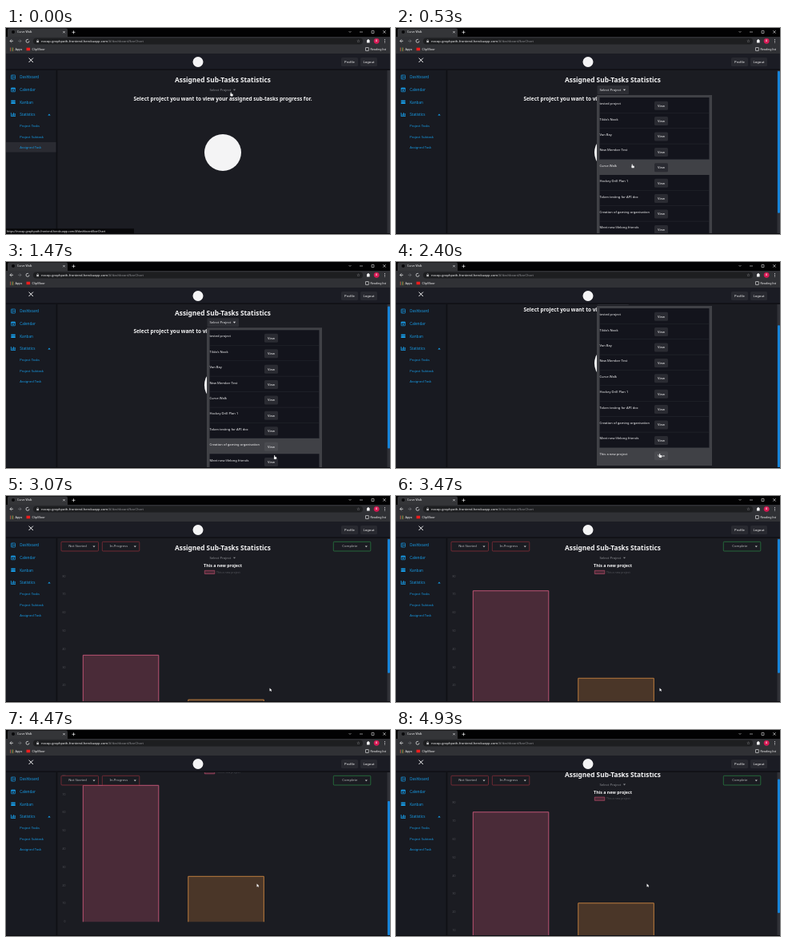
Write an HTML page with a canvas that moves like this. It is 480 px wide and 258 px high and loops after 5.07 s.

```html
<!DOCTYPE html>
<html lang="en">
<head>
<meta charset="utf-8">
<title>Sub-task statistics</title>
<style>
  html, body { margin: 0; width: 100%; height: 100%; overflow: hidden; background: #1b1c22; }
  canvas { display: block; width: 480px; height: 258px; }
</style>
</head>
<body>
<canvas id="stage"></canvas>
<script>
const W = 480, H = 258, LOOP = 5070, STEP = 200 / 3, LAST_STEP = 74;
const OPEN = 265, CLOSE = 2460, CHART = 2925, BAR_START = 2912;
const BLUE = '#179be6', WHITE = '#f4f4f5';
const ROW = 19.4, ROWS_TOP = 87;
const projects = ['tested project', "Tilda's Nook", 'Van Bay', 'New Member Test', 'Curve Walk',
  'Hockey Drill Plan 1', 'Token testing for API doc', 'Creation of gaming organisation',
  'Meet new lifelong friends', 'This a new project'];
const address = 'nocap-graphpath-frontend.herokuapp.com';
const route = '/#/dashboard/barChart';

const canvas = document.getElementById('stage');
const ctx = canvas.getContext('2d');
const ratio = window.devicePixelRatio || 1;
canvas.width = W * ratio;
canvas.height = H * ratio;
ctx.scale(ratio, ratio);
ctx.textBaseline = 'middle';

// Drawing helpers
function rect(x, y, w, h, fill, radius = 0, stroke, lineWidth = 0.7) {
  ctx.beginPath();
  ctx.roundRect(x, y, w, h, radius);
  if (fill) { ctx.fillStyle = fill; ctx.fill(); }
  if (stroke) { ctx.strokeStyle = stroke; ctx.lineWidth = lineWidth; ctx.stroke(); }
}
function circle(x, y, r, fill) {
  ctx.beginPath();
  ctx.arc(x, y, r, 0, 7);
  ctx.fillStyle = fill;
  ctx.fill();
}
function line(points, color, width = 0.8) {
  ctx.beginPath();
  points.forEach(([x, y]) => ctx.lineTo(x, y));
  ctx.strokeStyle = color;
  ctx.lineWidth = width;
  ctx.stroke();
}
function shape(points, fill) {
  ctx.beginPath();
  points.forEach(([x, y]) => ctx.lineTo(x, y));
  ctx.fillStyle = fill;
  ctx.fill();
}
function text(str, x, y, size, color = WHITE, align = 'left', weight = 400) {
  ctx.font = `${weight} ${size}px "Noto Sans", "Open Sans", sans-serif`;
  ctx.textAlign = align;
  ctx.fillStyle = color;
  ctx.fillText(str, x, y);
  return ctx.measureText(str).width;
}
const caret = (x, y, color) => shape([[x - 1.6, y - 0.8], [x + 1.6, y - 0.8], [x, y + 1.1]], color);
function cross(x, y, r, width) {
  line([[x - r, y - r], [x + r, y + r]], WHITE, width);
  line([[x + r, y - r], [x - r, y + r]], WHITE, width);
}

// Timing helpers
function ease(t, from, to) {
  const p = Math.min(1, Math.max(0, (t - from) / (to - from)));
  return (1 - Math.cos(Math.PI * p)) / 2;
}
function scrollAt(t) {
  if (t < CLOSE) return 29 * ease(t, 1415, 1733);
  return 44 * ease(t, 3960, 4270) - 34.8 * ease(t, 4400, 4933);
}
const cursorMoves = [
  [60, 140, 283, 82], [270, 740, 305, 235], [800, 1210, 336.5, 244.5],
  [1920, 2140, 330.5, 242.5], [3460, 3880, 314.5, 194.5]
];
function cursorAt(t) {
  let x = 282, y = 83;
  for (const [from, to, nx, ny] of cursorMoves) {
    const p = ease(t, from, to);
    x += (nx - x) * p;
    y += (ny - y) * p;
  }
  return [x, y];
}

function drawBrowser() {
  rect(0, 0, W, 11, '#020203');
  rect(2, 0.5, 75, 12, '#343538', 2);
  rect(0, 11, W, 21, '#303135');
  circle(9, 5, 2, '#09090b');
  text('Curve Walk', 14, 5.2, 3.5);
  cross(72.5, 5.2, 1.2, 0.6);
  line([[82.5, 5.3], [86.5, 5.3]], WHITE, 0.7);
  line([[84.5, 3.3], [84.5, 7.3]], WHITE, 0.7);
  line([[428.5, 4], [430, 5.5], [431.5, 4]], '#c9c9cb', 0.6);
  line([[442, 5], [446, 5]], '#dedee0', 0.6);
  rect(457, 3.5, 3, 3, null, 0, '#dedee0', 0.6);
  cross(473, 4.9, 1.7, 0.6);

  line([[9, 16.3], [5, 16.3], [7, 14.3]], WHITE, 0.7);
  line([[5, 16.3], [7, 18.3]], WHITE, 0.7);
  line([[15, 16.3], [19, 16.3], [17, 14.3]], '#75767a', 0.7);
  line([[19, 16.3], [17, 18.3]], '#75767a', 0.7);
  ctx.beginPath();
  ctx.arc(27, 16.3, 2, 0, 5.3);
  ctx.strokeStyle = WHITE;
  ctx.lineWidth = 0.7;
  ctx.stroke();
  rect(34, 12.5, 412, 8, '#1d1e20', 4);
  rect(38.3, 16, 2.6, 2.2, '#c4c4c6');
  rect(38.8, 14.6, 1.6, 2, null, 0.7, '#c4c4c6', 0.5);
  const width = text(address, 44, 16.5, 4.1);
  text(route, 44 + width, 16.5, 4.1, '#8d8e92');
  text('☆', 440.5, 16.2, 5, '#d5d5d7', 'center');
  rect(451, 15, 3.6, 3.4, WHITE, 0.5);
  circle(452.8, 14.8, 0.9, WHITE);
  circle(463.2, 16.3, 3.4, '#d81b55');
  text('A', 463.2, 16.5, 3.4, WHITE, 'center');
  for (let i = -1; i < 2; i++) circle(473.5, 16.3 + i * 1.7, 0.5, WHITE);

  for (let i = 0; i < 9; i++) {
    circle(5.5 + i % 3 * 1.6, 25 + Math.floor(i / 3) * 1.6, 0.6, ['#e05a4e', '#4d9b60', '#d3a53c'][i % 3]);
  }
  text('Apps', 11.5, 26.7, 3.8);
  rect(25.5, 24.7, 4.6, 3.6, '#ef1d1d');
  text('ClipMoor', 32.5, 26.7, 3.8);
  rect(449.5, 24.5, 3.8, 4, null, 0.3, WHITE, 0.6);
  text('Reading list', 455.5, 26.7, 3.6);
}

function drawHeader() {
  rect(0, 32, W, 20, '#1b1c24');
  rect(0, 51.3, W, 1.7, '#101116');
  cross(31.2, 40.3, 2.7, 1);
  circle(240, 42.5, 6.5, WHITE);
  [['Profile', 419], ['Logout', 443]].forEach(([label, x]) => {
    rect(x, 37, 21, 11, '#282930', 1.5);
    text(label, x + 10.5, 42.6, 4.25, WHITE, 'center');
  });
}

function drawSidebar(t) {
  rect(0, 53, 62.5, 205, '#181a21');
  rect(62.5, 53, 1.8, 205, '#0f1015');
  if (t < OPEN) rect(0, 143, 62.5, 12.5, '#2a2b32');
  rect(6.5, 59, 5, 5, null, 0.4, BLUE);
  line([[8.2, 59], [8.2, 64]], BLUE, 0.6);
  line([[8.2, 61.5], [11.5, 61.5]], BLUE, 0.6);
  rect(6.5, 75, 5, 4.8, null, 0.4, BLUE);
  rect(6.5, 75, 5, 1.6, BLUE);
  rect(7.8, 77.5, 2.4, 1.2, BLUE);
  rect(6.3, 90.4, 5.4, 2, BLUE, 0.3);
  rect(6.3, 93, 5.4, 2, BLUE, 0.3);
  line([[6.3, 106], [6.3, 110.5], [12, 110.5]], BLUE);
  [2.2, 3.5, 2.8].forEach((h, i) => rect(7.5 + i * 1.6, 109.8 - h, 1, h, BLUE));
  shape([[52.3, 109.4], [54, 107.4], [55.7, 109.4]], BLUE);
  ['Dashboard', 'Calendar', 'Kanban', 'Statistics'].forEach((label, i) =>
    text(label, 17.2, 62 + i * 15.7, 4.65, BLUE, 'left', 500));
  ['Project Tasks', 'Project Subtask', 'Assigned Task'].forEach((label, i) =>
    text(label, 17.2, 123.3 + i * 13.1, 4.1, BLUE, 'left', 500));
}

function drawScrollbar(scroll, contentHeight) {
  const view = 204;
  rect(476.5, 53, 3.5, 205, '#303137');
  if (contentHeight > view) {
    rect(477, 54 + scroll * view / contentHeight, 3, view * view / contentHeight, '#1683d8', 1);
  }
}

function drawMenu(t, cursorX, cursorY) {
  rect(251, 84, 144, 200, '#404146');
  const hover = t < 1700 ? Math.floor((cursorY - 3 - ROWS_TOP) / ROW) : projects.length - 1;
  const onButton = cursorX > 323 && cursorX < 340;
  projects.forEach((name, i) => {
    const y = ROWS_TOP + i * ROW;
    const active = i === hover;
    if (!active) {
      rect(254.5, y, 137, ROW, '#13141c');
      rect(254.5, y + ROW - 0.5, 137, 0.5, '#25262e');
    }
    text(name, 254.5, y + 8, 4.1);
    rect(323, y + 4.7, 17, 11, active && onButton ? '#4a4b50' : '#2a2b32', 1.5);
    text('View', 331.5, y + 10.4, 4.1, WHITE, 'center');
  });
}

function drawChart(t) {
  const base = 283, unit = 2.28;
  const progress = 1 - (1 - Math.min(1, Math.max(0, (t - BAR_START) / 1000))) ** 4;
  text('This a new project', 271, 87.2, 5.3, WHITE, 'center', 700);
  rect(248.3, 93.3, 12.5, 4.2, '#4d2a38', 0, '#b34c69');
  text('This a new project', 263, 95.5, 3.5, '#55565c');
  for (let value = 0; value <= 80; value += 10) {
    text(value, 74.5, base - value * unit, 3.4, '#54555b', 'right');
  }
  [[75, '#4a2b38', '#bd5474'], [25, '#4a3628', '#bd7c3e']].forEach(([value, fill, stroke], i) => {
    const height = value * unit * progress;
    const x = 96.3 + i * 131.5, top = base - height;
    rect(x, top, 94.5, height, fill);
    line([[x, base], [x, top], [x + 94.5, top], [x + 94.5, base]], stroke, 1);
  });
}

function drawFilters() {
  [['Not Started', 69, '#93303c'], ['In-Progress', 120.3, '#93303c'], ['Complete', 409.3, '#2a8745']]
    .forEach(([label, x, color]) => {
      rect(x, 57.3, 46.5, 11.7, '#1b1c22', 1, color);
      text(label, x + 20.5, 63.3, 4.2, '#b8b8bb', 'center');
      caret(x + 41, 63.2, '#c9c9cb');
    });
}

function drawPointer(x, y, hand) {
  if (hand) {
    rect(x - 1.4, y - 2.5, 1.1, 4, WHITE, 0.5);
    rect(x - 1.6, y - 0.4, 3.3, 2.8, WHITE, 0.9);
  } else {
    shape([[x - 1, y - 2], [x - 1, y + 2], [x, y + 1.2], [x + 0.7, y + 2.4],
      [x + 1.3, y + 2], [x + 0.7, y + 0.9], [x + 1.9, y + 0.8]], WHITE);
  }
}

function draw(t) {
  const scroll = scrollAt(t), [cx, cy] = cursorAt(t);
  const menuOpen = t >= OPEN && t < CLOSE, charted = t >= CHART;
  rect(0, 0, W, H, '#1b1c22');

  ctx.save();
  ctx.translate(0, -scroll);
  text('Assigned Sub-Tasks Statistics', 271, 66.1, 8.3, WHITE, 'center', 700);
  if (menuOpen) rect(251.5, 72, 39.5, 11, '#2d2e34', 1);
  const selectColor = menuOpen ? '#e8e8ea' : '#8b8c91';
  text('Select Project', 254.5, 77.6, 4.25, selectColor);
  caret(285.5, 77.5, selectColor);
  if (charted) {
    drawChart(t);
  } else {
    text('Select project you want to view your assigned sub-tasks progress for.',
      271, 88.9, 6.5, WHITE, 'center', 700);
    circle(271, 156, 23, WHITE);
  }
  if (menuOpen) drawMenu(t, cx, cy);
  ctx.restore();

  if (charted) drawFilters();
  drawScrollbar(scroll, charted ? 248 : menuOpen ? 234 : 204);
  drawSidebar(t);
  drawHeader();
  drawBrowser();
  rect(0, 257, W, 1, '#0c0c10');
  if (t < OPEN) {
    rect(0, 251.3, 160, 6.7, '#08080a');
    text('https://' + address + route, 1, 254.8, 3.55);
  }
  drawPointer(cx, cy, t < CLOSE);
}

function frame() {
  const elapsed = performance.now() % LOOP;
  draw(Math.min(LAST_STEP, Math.floor((elapsed + 5) / STEP)) * STEP);
  requestAnimationFrame(frame);
}
frame();
</script>
</body>
</html>
```
